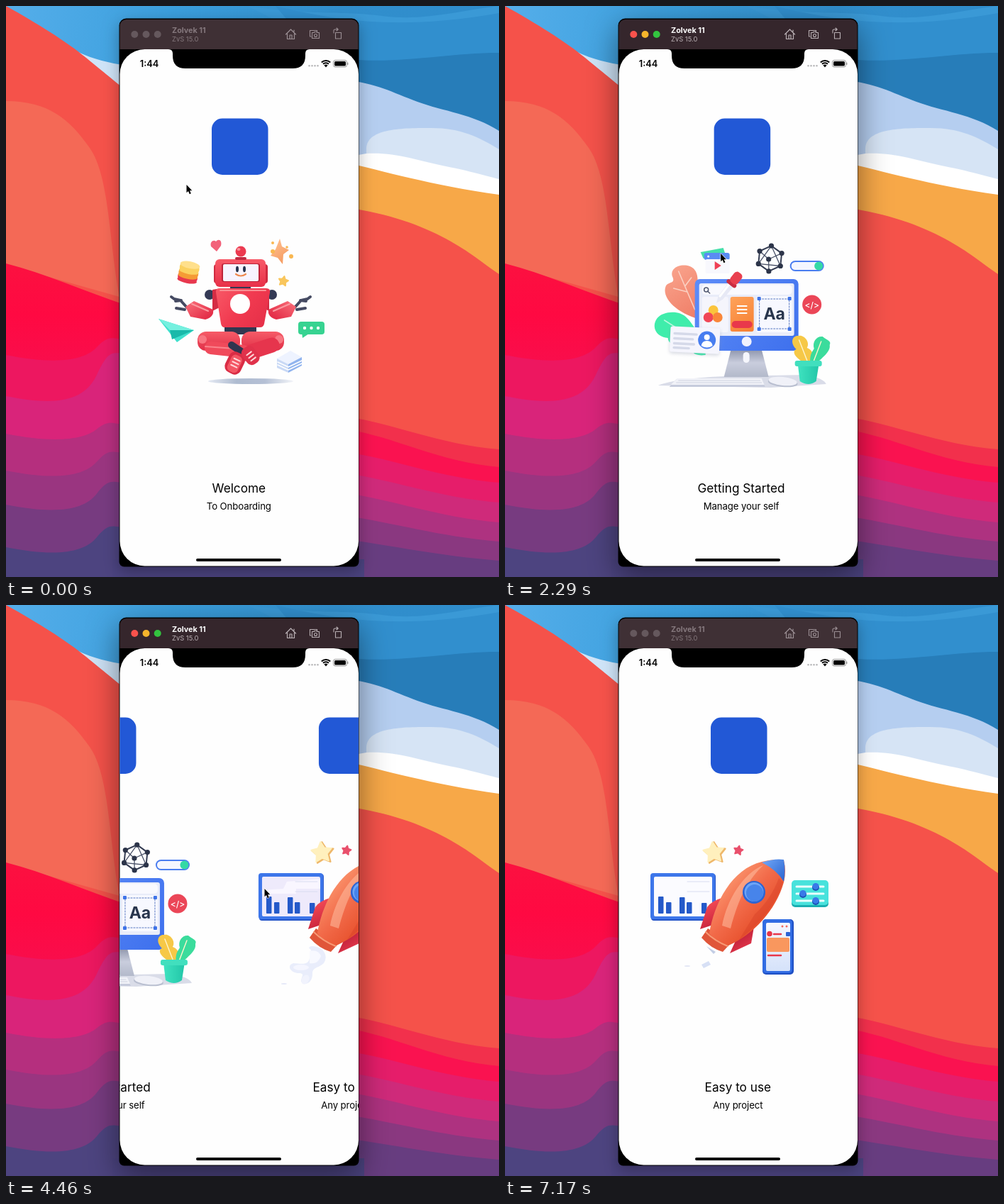
Write an HTML page with a canvas that moves like this. It is 695 px wide and 805 px high and loops after 7340 ms.

```html
<!DOCTYPE html>
<html lang="en">
<head>
<meta charset="utf-8">
<title>Onboarding</title>
<style>
html, body { margin: 0; width: 100%; height: 100%; overflow: hidden; background: #4a4680; }
canvas { display: block; }
</style>
</head>
<body>
<canvas id="stage" width="695" height="805"></canvas>
<script>
const c = document.getElementById('stage').getContext('2d');
const LOOP = 7340, PAGE = 337;
const FONT = 'Inter, "Liberation Sans", sans-serif';

// ---- drawing helpers ----
function grad(x0, y0, x1, y1, ...cols) {
  const g = c.createLinearGradient(x0, y0, x1, y1);
  cols.forEach((k, i) => g.addColorStop(i / (cols.length - 1), k));
  return g;
}
function shape(d, fill) { c.fillStyle = fill; c.fill(new Path2D(d)); }
function stroke(d, color, w = 1) {
  c.strokeStyle = color; c.lineWidth = w; c.lineCap = c.lineJoin = 'round';
  c.stroke(new Path2D(d));
}
function box(x, y, w, h, r, fill) {
  c.fillStyle = fill; c.beginPath(); c.roundRect(x, y, w, h, r); c.fill();
}
function oval(x, y, rx, ry, fill, rot = 0) {
  c.fillStyle = fill; c.beginPath(); c.ellipse(x, y, rx, ry, rot, 0, 7); c.fill();
}
const dot = (x, y, r, fill) => oval(x, y, r, r, fill);
function text(s, x, y, font, fill, align = 'left', gap = 0) {
  c.font = font + ' ' + FONT; c.fillStyle = fill; c.textAlign = align;
  c.letterSpacing = gap + 'px'; c.fillText(s, x, y); c.letterSpacing = '0px';
}
function star(x, y, r, fill, rot = 0) {
  c.beginPath();
  for (let i = 0; i < 10; i++) {
    const a = rot + i * Math.PI / 5 - Math.PI / 2, q = i % 2 ? r * .52 : r;
    c.lineTo(x + q * Math.cos(a), y + q * Math.sin(a));
  }
  c.closePath();
  c.fillStyle = c.strokeStyle = fill; c.lineWidth = 2; c.lineJoin = 'round';
  c.fill(); c.stroke();
}
function at(x, y, rot, fn) { c.save(); c.translate(x, y); c.rotate(rot); fn(); c.restore(); }
function mirror(x, fn) { fn(); c.save(); c.translate(2 * x, 0); c.scale(-1, 1); fn(); c.restore(); }

// ---- wallpaper ----
function wallpaper() {
  c.fillStyle = grad(0, 0, 695, 90, '#55aeea', '#3b9fdd', '#318fcd', '#2f8ccb');
  c.fillRect(0, 0, 695, 300);
  shape('M340 0C430 14 470 6 530 14S640 6 695 0V70H480Z', '#3a99d6');
  shape('M380 0C470 22 560 34 695 10V120H480Z', '#318fce');
  shape('M480 75C560 82 620 66 695 66V200H480Z', '#277db9');
  shape('M100 64C125 76 145 80 170 84V130Z', '#cfe4f8');
  shape('M480 105C520 108 545 122 580 135S660 153 695 176V290H480Z', '#b5cef0');
  shape('M508 200C510 172 560 172 600 172S665 184 695 202V270H508Z', '#d6e4f5');
  shape('M480 213L508 208C550 206 580 218 620 226S670 238 695 244V275H480Z', '#fff');
  shape('M480 221C530 232 600 253 695 266V400H480Z', '#f7a848');
  shape('M0 0C45 25 85 50 113 73S150 103 170 120V284H480C540 293 585 309 620 328S670 361 695 378V805H0Z', '#f5524a');
  shape('M0 134C60 134 90 160 118 200S145 330 160 410L0 365Z', '#f46956');

  // [height at the outer edge, height at the window, colour]
  shape('M0 363C55 377 110 402 170 422V805H0Z', grad(0, 370, 0, 500, '#fc1040', '#ff0942', '#f90d4b'));
  [[492, 470, '#ed1760'], [550, 490, '#d9247a'], [603, 590, '#b52f7e'], [655, 630, '#9a3580'],
   [703, 672, '#773b80'], [763, 735, '#4d4480']].forEach(([a, b, k]) =>
    shape(`M0 ${a}C70 ${a + 14} 110 ${a + 8} 128 ${(a + b) / 2}S150 ${b} 170 ${b}V805H0Z`, k));
  [[582, 625, '#f2304c'], [600, 650, '#fa1250'], [632, 672, '#e61d6a'], [662, 700, '#cf2a7a'],
   [690, 728, '#ae3280'], [722, 755, '#8a3880'], [755, 782, '#673d80']].forEach(([a, b, k]) =>
    shape(`M480 ${a - 3}C545 ${a + 6} 610 ${b - 7} 695 ${b}V805H480Z`, k));
  c.fillStyle = '#4b4380'; c.fillRect(150, 780, 355, 25);
}

// ---- page illustrations ----
function robot() {
  oval(345, 529, 60, 4, grad(285, 0, 405, 0, '#e4e9f3', '#aebbd0', '#b5c0d5', '#f2f4f8'));
  shape('M297 346L289 339C287 332 293 329 296 332C300 327 305 331 303 338Z', '#f2627a');
  at(258, 373, .2, () => {
    [['#e8384e', 10], ['#f59b35', 4], ['#fbd160', -3]].forEach(([k, y]) => {
      box(-14, y - 5, 28, 9, 4, k); oval(0, y + 4, 14, 4, k);
    });
    oval(0, -8, 14, 5, '#ffe08c');
  });
  shape('M386 328L389 339L399 344L391 350L390 364L383 355L373 352L380 343Z',
    grad(374, 330, 397, 360, '#ffc293', '#f5995e'));
  [[376, 334, 2], [402, 353, 3], [376, 346, 3], [396, 340, 1.8]].forEach(p => dot(...p, '#f9b750'));
  star(391, 388, 7, '#f9c65c', .2);
  shape('M215 441L265 457L241 474Z', '#3fe0cd');
  shape('M215 441L265 457L232 458Z', '#75f0df');
  shape('M231 457L265 457L234 470Z', '#19b9aa');
  box(412, 445, 37, 18, 4, '#37d391');
  shape('M417 460L418 468L427 462Z', '#37d391');
  [421, 430.5, 440].forEach(x => dot(x, 454, 2.2, '#fff'));
  shape('M382 497L401 486L417 495L398 505Z', '#eef3ff');
  shape('M382 497L398 505V517L382 510Z', '#c9d9f5');
  shape('M398 505L417 495V507L398 517Z', '#91b4ee');
  stroke('M383 502L398 509L417 500M383 506L398 513L417 504', '#fff', 1.5);

  mirror(331, () => {
    stroke('M255 425L246 415L237 413L233 410M252 428L240 426M247 415L239 416', '#454a62', 4);
    dot(287, 407, 7, '#343a55');
    shape('M291 400L303 398V424L291 430Z', '#d52c44');
    shape('M253 424L265 416L292 428Q294 438 281 442L260 438Z', grad(260, 416, 278, 442, '#f86a76', '#e4304a'));
    stroke('M262 420L285 430', '#fa9aa0', 2);
  });
  box(316, 392, 29, 9, 3, '#333852');
  box(293, 364, 76, 27, 4, '#d02a40');
  box(295, 357, 71, 39, 6, grad(0, 357, 0, 396, '#f85a68', '#e83049'));
  box(304, 363, 54, 26, 3, '#bd2339');
  box(306, 364, 50, 24, 2, '#f7f4ff');
  box(323, 354, 16, 4, 2, '#c22a42');
  dot(331, 346, 7.5, '#ec3a50'); oval(328, 343, 2.5, 2, '#f9959d');
  oval(326, 371, 2, 4.2, '#27344f'); oval(336, 371, 2, 4.2, '#27344f');
  stroke('M324 378Q331 383 338 378', '#ef8a50', 2.2);
  box(308, 448, 45, 15, 5, '#323750');
  shape('M301 398H367Q373 398 372 404L364 448Q363 453 358 453H308Q304 453 303 448L296 404Q295 398 301 398Z',
    grad(298, 398, 365, 453, '#f85866', '#f13a50', '#e52f48'));
  stroke('M302 401H366', '#fa8d92', 2);
  dot(330, 420, 14, '#fff');
  mirror(331, () => {
    box(270, 459, 60, 27, 12, grad(0, 459, 0, 486, '#f65c68', '#e02f47'));
    dot(277, 470, 6, '#f87782');
  });
  stroke('M375 478L338 490', '#e6354d', 21);
  stroke('M289 482L335 487', '#f04a5b', 18);
  stroke('M281 480L322 483', '#fa838c', 2);
  stroke('M318 478L333 488', '#30354f', 10);
  at(323, 503, .45, () => {
    box(-12, -15, 24, 31, 9, '#da2c45'); box(-8, -11, 16, 25, 6, '#f35664');
    stroke('M-4 -5H5M-4 0H5M-4 5H5', '#ffd6d8', 2);
  });
  at(345, 493, -.65, () => {
    box(-10, -14, 20, 27, 8, '#e0324b'); stroke('M-4 -4H4M-4 1H4M-4 6H4', '#ffd6d8', 2);
  });
}

function desk() {
  shape('M211 535Q235 525 305 522L420 520Q445 525 448 533L370 538Z', '#d9dce8');
  shape('M264 440C234 430 216 410 222 395C226 388 235 392 232 383C226 370 242 362 256 367C268 372 268 385 266 400Z',
    grad(222, 370, 268, 435, '#f9a48d', '#f07f68'));
  stroke('M240 374L263 428M233 398L252 403M258 383L249 395', '#fbd0c2', 1.6);
  shape('M278 492C262 494 256 488 262 478C240 482 225 478 225 468C206 466 202 450 210 440C218 430 242 428 252 440C262 450 280 480 278 492Z', '#3fedab');
  stroke('M220 443L250 462', '#b5f8dc', 1.6);
  shape('M271 347L303 341L306 350L275 356Z', '#46dfaa');
  box(276, 348, 36, 10, 3, '#5a8bf3'); dot(282, 353, 1.5, '#fff');
  box(278, 357, 34, 20, 2, '#f8f8fd');
  shape('M291 360L300 366L291 372Z', '#ef4055');

  const v = [...Array(6)].map((_, i) =>
    [369 + 18 * Math.sin(i * 1.047 + .1), 356 - 18 * Math.cos(i * 1.047 + .1)]);
  const hub = [367, 357];
  v.forEach((p, i) => {
    stroke(`M${p}L${v[(i + 1) % 6]}`, '#343c52', 2);
    stroke(`M${p}L${i % 2 ? hub : v[(i + 2) % 6]}`, '#4a5268', 1.3);
  });
  [...v, hub].forEach(p => dot(...p, 3.6, '#2c3449'));

  box(397, 359, 48, 15, 7.5, '#4a7df0'); box(399, 361, 44, 11, 5.5, '#f4f6ff');
  dot(437.5, 366.5, 6, '#34d9a5');

  shape('M314 484H357L367 523H304Z', grad(0, 484, 0, 522, '#8e95ab', '#c9cddd', '#b4bacb'));
  box(331, 488, 9, 15, 4.5, '#f5f6fc');
  box(263, 385, 146, 101, 7, grad(263, 385, 409, 486, '#5d8cf8', '#3e70ed'));
  box(269, 391, 134, 74, 3, '#e9ecf9');
  box(273, 393, 127, 14, 5, '#f9f9fe');
  c.beginPath(); c.arc(279, 400, 3, 0, 7); c.strokeStyle = '#505870'; c.lineWidth = 1.5; c.stroke();
  stroke('M281 402L284 405', '#505870', 1.5);
  dot(336, 473, 7, '#f0f2fd');
  box(273, 410, 37, 50, 3, '#f5f5fc');
  dot(289, 429, 7, '#fbc43c'); dot(282, 439, 7, '#f04656'); dot(295, 439, 7, '#fa8639');
  box(313, 410, 33, 49, 3, grad(313, 410, 346, 459, '#ffa35a', '#f57e31'));
  stroke('M323 423H336M323 428H336M323 433H336', '#fff', 1.8);
  box(315, 444, 29, 10, 5, '#e9384b');
  box(350, 409, 50, 51, 2, '#f7f8ff');
  c.setLineDash([2, 2]); c.strokeStyle = '#5878c0'; c.lineWidth = 1;
  c.strokeRect(354, 413, 42, 42); c.setLineDash([]);
  [[351, 410], [394, 410], [351, 453], [394, 453]].forEach(p => box(...p, 5, 5, 1, '#3e73e8'));
  text('Aa', 375, 442, '700 23px', '#28354c', 'center');
  at(311, 396, .66, () => {
    shape('M-4 -6H5L4 19L0 29L-4 19Z', '#e7e9f5'); stroke('M-2 -4V18', '#fff', 3);
    box(-8, -9, 16, 6, 3, '#c92c42'); box(-6, -25, 13, 18, 5, '#e9404f');
  });

  at(263, 471, .05, () => {
    c.save(); c.shadowColor = '#8289a555'; c.shadowBlur = 5; c.shadowOffsetY = 2;
    box(-35, -18, 70, 36, 3, '#f5f5fd'); c.restore();
    stroke('M-29 -8H2M-29 -1H-3M-29 6H-1M-29 12H-8', '#d5d9e9', 3.4);
  });
  dot(280, 471, 12.5, '#477df0'); dot(280, 467, 4, '#fff');
  shape('M272 479Q273 472 280 472T288 479Q280 484 272 479Z', '#fff');

  shape('M237 526H357L362 537H227Z', '#c6cbdc'); shape('M238 525H357L361 534H229Z', '#f1f2f8');
  stroke('M240 528H355M237 531H357', '#cfd3e1', 1);
  oval(387, 531, 21, 6, '#b9bfd0', .1); oval(387, 529, 20, 6, '#f0f1f8', .1);
  dot(428, 421, 13.5, '#eb4657');
  text('</>', 428, 425.5, '500 12px', '#fff', 'center');
  shape('M419 504C402 495 400 486 406 484C396 474 401 464 409 465C417 463 426 474 421 482C432 486 430 496 425 504Z', '#f6c847');
  shape('M426 504C424 490 430 486 431 483C428 473 435 465 443 466C449 471 456 472 453 478C455 488 440 497 435 504Z', '#3bdc9c');
  stroke('M410 471L422 502M441 473L430 502', '#fff4cc', 1.4);
  shape('M408 504H438L434 529Q423 537 411 529Z', grad(408, 0, 438, 0, '#3fe3c0', '#22c6a8'));
  box(404, 500, 38, 8, 3, '#41dfbe');
}

function rocket(thin) {
  star(296, 350, 16, '#efb86b', -.1); star(294, 349, 15, '#fff0bd', -.1);
  star(329, 346, 6.5, '#e9506c', .2);
  if (!thin) {
    shape('M279 486C272 482 280 478 293 484Q304 494 297 505C288 513 282 510 281 519C282 535 266 538 265 530C266 522 270 521 264 519C250 520 244 508 254 505C267 506 275 508 277 498Z', '#e9edfb');
    shape('M277 488Q289 485 293 495Q289 507 277 505Z', '#f8f9ff');
    oval(265, 511, 11, 4, '#f5f6ff'); oval(271, 528, 5, 7, '#f1f3fd', .5); oval(241, 534, 4, 1, '#e6e9f8');
  } else {
    shape('M277 507L287 502L290 507L280 512Z', '#d7e0f5');
    shape('M284 481L297 489L294 492Z', '#c3cee5');
    oval(257, 509, 4, 1, '#e3e7f5');
  }
  box(206, 379, 91, 66, 4, '#2454c9'); box(205, 378, 91, 65, 4, '#3d76ea');
  box(210, 383, 82, 56, 2, thin ? '#fbfbff' : '#eeeafb');
  if (!thin) shape('M210 402L240 400L245 390L292 386V400H258V407H210Z', '#f9f6ff');
  stroke('M257 390H288M257 404H288', '#d8dcf0', 1);
  [[216, 24], [227, 16], [246, 23], [256, 16], [277, 15]].forEach(([x, h]) => box(x, 435 - h, 7.5, h, 1, '#2459c9'));

  box(404, 390, 52, 36, 5, '#1aaeb1'); box(404, 388, 52, 35, 5, '#48e2dc');
  stroke('M411 397H449M411 407H449M411 417H449', '#eafffd', 3);
  [[438, 397], [420, 407], [438, 417]].forEach(([x, y]) => { dot(x, y + 1, 5, '#1b4fb3'); dot(x, y - .5, 4.5, '#3979e8'); });

  box(363, 443, 44, 78, 5, '#1e4fc4'); box(363, 443, 42, 76, 5, '#316ce3');
  box(368, 448, 34, 68, 2, grad(0, 448, 0, 516, '#f6f7ff', '#d5e2fa'));
  dot(391, 453, 1.5, '#ef6a60'); dot(397, 453, 1.5, '#ef6a60');
  dot(373, 463.5, 3.8, '#e83649'); stroke('M379 464H389', '#e83649', 2.5); box(396, 461, 6, 6, 1, '#2c63d5');
  box(369, 469, 32, 20, 2, '#f9975e'); stroke('M371 494H389', '#e83649', 2.5);

  shape('M309 412Q291 417 285 426L275 457L299 449Z', grad(285, 420, 300, 455, '#f24a55', '#c51f3a'));
  shape('M328 467L352 448L347 477L317 491Z', grad(328, 460, 345, 485, '#b81d36', '#e5384c'));
  shape('M286 456L318 477L307 489Q290 484 277 469Z', '#e05639');
  shape('M288 463C295 420 320 372 362 362Q382 357 393 360Q397 375 393 391C382 430 350 465 315 480Q297 475 288 463Z',
    grad(312, 390, 365, 440, '#fa916a', '#f26b4a', '#e8532f'));
  shape('M306 452C313 415 336 378 364 367C345 385 330 410 318 456Z', 'rgba(255,190,160,.55)');
  shape('M352 436Q375 415 386 385L392 391Q378 435 330 472Z', 'rgba(205,55,35,.3)');
  stroke('M283 461Q296 474 314 481', '#f79a75', 2);
  shape('M362 363Q380 357 393 359Q396 374 393 390Q384 374 362 363Z', grad(365, 360, 394, 385, '#6ea4f5', '#2e69d3'));
  dot(351, 405, 16, '#2c64d3'); dot(351, 404.5, 13.5, '#6da4f6'); dot(352, 406, 12, '#4784ea');
}

const pages = [
  [robot, 'Welcome', 'To Onboarding'],
  [desk, 'Getting Started', 'Manage your self'],
  [rocket, 'Easy to use', 'Any project']
];
function page(i, x, thin) {
  if (Math.abs(x) >= PAGE) return;
  const [art, title, sub] = pages[i];
  c.save(); c.translate(x, 0);
  box(290, 158.5, 79.5, 79.5, 15, '#2258d6');
  art(thin);
  text(title, 328.3, 686, '400 17.2px', '#000', 'center');
  text(sub, 328.3, 710, '400 13.2px', '#000', 'center', -.1);
  c.restore();
}

// ---- phone window ----
function phoneFrame(on, shade) {
  c.save();
  c.shadowColor = `rgba(0,0,0,${shade ? .46 : .3})`;
  c.shadowBlur = shade ? 44 : 22; c.shadowOffsetY = shade ? 14 : 7;
  box(159.5, 17.5, 338, 773, [10, 10, 7, 7], '#000');
  c.restore();
  box(160.5, 19, 336, 50, [9, 9, 0, 0], on ? '#35262c' : '#3f3035');
  const lights = on ? ['#f9524c', '#f6b52c', '#33c43f'] : Array(3).fill('#65585d');
  lights.forEach((k, i) => dot(181.3 + 16.2 * i, 40, 5, k));
  text('Zolvek 11', 234, 38, '700 10.8px', on ? '#fff' : '#85787d');
  text('ZvS 15.0', 234, 50, '400 9.4px', on ? '#bbb1b5' : '#85787d');
  const k = on ? '#b9b0b4' : '#9b8f94';
  stroke('M394.5 40L401.5 33L408.5 40M396.5 39V46.5H406.5V39M400 46V41H403V46M406 36V34', k, 1.2);
  stroke('M430 43H428.5V34.5H438.5V36M431.5 37.5H434L435 36.5H438L439 37.5H441.5V45.5H431.5Z', k, 1.1);
  c.beginPath(); c.arc(436.5, 41.5, 2, 0, 7); c.stroke();
  stroke('M464.5 37.5H472.5V46H464.5ZM462 38V34.5Q462 33 464 33H468M466 31L468.2 33L466 35', k, 1.1);
  c.fillStyle = '#000'; c.fillRect(160, 61, 337, 80);
  box(160.5, 61, 336.5, 728.5, 35, '#fefefe');
}
function overlay() {
  shape('M229 61Q235 61 235 67V70Q235 88 253 88H404Q422 88 422 70V67Q422 61 428 61Z', '#000');
  text('1:44', 202, 85.5, '600 12.8px', '#000', 'center');
  [427.5, 431.5, 435.5, 439.5].forEach(x => dot(x, 84.3, 1.2, '#b5b5b7'));
  [9, 5.8].forEach(r => {
    c.beginPath(); c.arc(451, 86, r, -2.33, -.81);
    c.strokeStyle = '#000'; c.lineWidth = 2; c.lineCap = 'butt'; c.stroke();
  });
  shape('M451 86.5L448.4 83.5Q451 81.6 453.6 83.5Z', '#000');
  c.strokeStyle = '#999'; c.lineWidth = 1;
  c.beginPath(); c.roundRect(461.5, 76.5, 19, 9.5, 2.6); c.stroke();
  box(463, 78, 16, 6.5, 1.5, '#000'); box(481.3, 79.5, 1.2, 3.5, .6, '#999');
  box(268, 779, 120, 4, 2, '#000');
}

// ---- motion ----
// drag start, release, settle, pixels dragged
const swipes = [[1710, 2000, 2410, 146], [3010, 3120, 3750, 78.5], [4290, 4460, 4750, 149], [5460, 5620, 5960, 150]];
function swipe(t, [a, b, end, d]) {
  if (t <= a) return 0;
  if (t < b) return d * ((t - a) / (b - a)) ** 2;
  if (t < end) return PAGE - (PAGE - d) * (1 - (t - b) / (end - b)) ** 3;
  return PAGE;
}
const path = [
  [10, 254, 252], [750, 397, 344], [800, 397, 344], [870, 399, 346], [1690, 399, 346], [2000, 254, 342],
  [2080, 243, 343], [2200, 243, 343], [2410, 383, 357], [2440, 383, 357], [2640, 320, 382], [3010, 320, 382],
  [3120, 245, 380], [3200, 228, 389], [3800, 228, 389], [3870, 227, 388], [4290, 227, 388], [4460, 364, 400],
  [4540, 364, 402], [4890, 364, 402], [5040, 322, 399], [5460, 322, 399], [5640, 485, 418], [6100, 485, 418],
  [6260, 617, 518], [6740, 617, 518], [6990, 686, 808]
];
function pointer(t) {
  let i = path.findIndex(p => p[0] > t);
  if (i < 0) return path[path.length - 1].slice(1);
  if (i === 0) return path[0].slice(1);
  const [a, x, y] = path[i - 1], [b, u, v] = path[i];
  const k = (t - a) / (b - a);
  return [x + (u - x) * k, y + (v - y) * k];
}
function arrow(x, y) {
  at(x, y, 0, () => {
    const d = 'M.5 0V11.2L3 8.9L4.8 13.2L6.8 12.3L5 8.2H8.3Z';
    stroke(d, '#fff', 1.2); shape(d, '#000');
  });
}

function draw(t) {
  wallpaper();
  phoneFrame(t >= 1710 && t < 7030, t >= 1710 && t < 7170);
  c.save();
  c.beginPath(); c.rect(160.5, 61, 336.5, 729); c.clip();
  const [s1, s2, s3, s4] = swipes.map(s => swipe(t, s));
  const thin = t >= 7170;
  if (s4 > 0) {
    page(1, s4, thin); page(2, s4 - PAGE, thin);
  } else {
    const s = s1 + s2 - s3;
    pages.forEach((_, i) => page(i, i * PAGE - s, thin));
  }
  c.restore();
  overlay();
  arrow(...pointer(t));
}

const start = performance.now();
function tick() {
  draw((performance.now() - start) % LOOP);
  requestAnimationFrame(tick);
}
tick();
</script>
</body>
</html>
```
